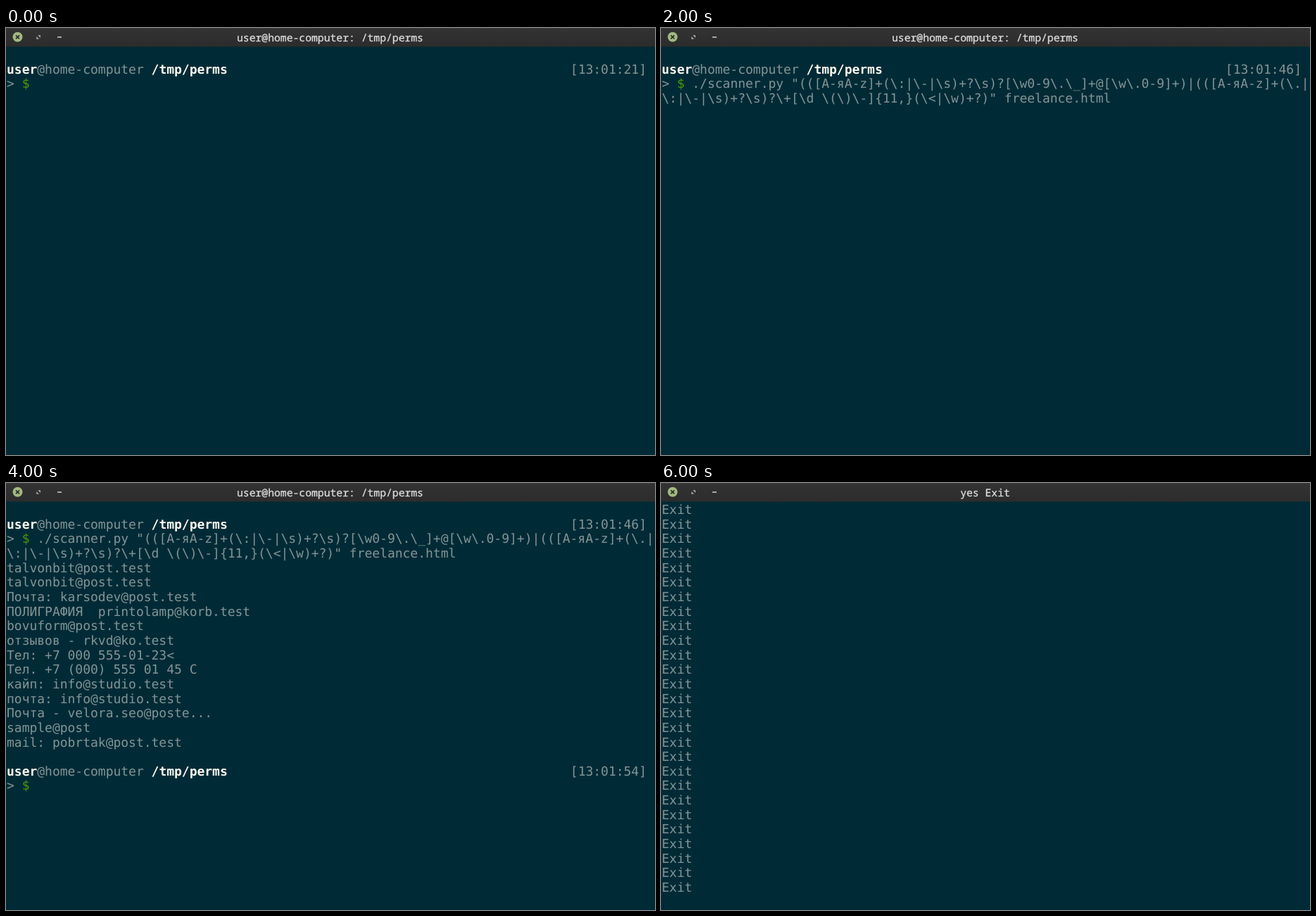
Recreate the animation shown at these times as an HTML page. Size 922 by 607 pixels, loop 8000 ms.

```html
<!DOCTYPE html>
<html lang="en">
<head>
<meta charset="utf-8">
<title>Terminal</title>
<style>
  html, body { margin: 0; width: 100%; height: 100%; overflow: hidden; background: #002b36; }
  svg { display: block; width: 922px; height: 607px; }
  text { white-space: pre; text-rendering: geometricPrecision; }
  #screen { font: 17.975px "DejaVu Sans Mono", monospace; fill: #839496; }
  #title { font: 500 14.72px "Noto Sans Mono", monospace; fill: #dcdcdc; stroke: #dcdcdc; stroke-width: .3px; text-anchor: middle; }
  .bold { font-weight: bold; fill: #fdfaf0; }
  .green { fill: #4e9a06; }
</style>
</head>
<body>
<svg viewBox="0 0 922 607">
  <defs>
    <linearGradient id="bar" x2="0" y2="1">
      <stop stop-color="#333"/>
      <stop offset="1" stop-color="#2c2c2c"/>
    </linearGradient>
  </defs>
  <rect width="922" height="607" fill="#002b36"/>
  <rect width="922" height="26.5" fill="url(#bar)"/>
  <rect width="922" height="1" fill="#3b3b3b"/>
  <circle cx="16.5" cy="12.8" r="7" fill="#a3b981"/>
  <path d="M14 10.3l5 5m0-5l-5 5" stroke="#2d2d2d" stroke-width="1.7"/>
  <path d="M45.2 10.2h3.8v3.8zM43.2 12v3.8h3.8z" fill="#a8a8a8"/>
  <path d="M73 13h6" stroke="#b5b5b5" stroke-width="1.8"/>
  <text id="title" x="460.5" y="18.6"></text>
  <g id="screen"></g>
</svg>
<script>
const COL = 10.822, ROW = 20.66, LEFT = 1, TOP = 43.95, HOLD = 2000;
const title = document.getElementById("title");
const screen = document.getElementById("screen");

const esc = s => s.replace(/&/g, "&amp;").replace(/</g, "&lt;");
const line = (row, html, col = 0) =>
  `<text x="${LEFT + col * COL}" y="${TOP + row * ROW}">${html}</text>`;
const lines = (row, list) => list.map((s, i) => line(row + i, esc(s))).join("");

const prompt = (row, time, command = "") =>
  line(row, '<tspan class="bold">user</tspan>@home-computer <tspan class="bold">/tmp/perms</tspan>') +
  line(row, `[${time}]`, 74) +
  line(row + 1, '&gt; <tspan class="green">$</tspan> ' + esc(command));

const command = String.raw`./scanner.py "(([А-яА-z]+(\:|\-|\s)+?\s)?[\w0-9\.\_]+@[\w\.0-9]+)|(([А-яА-z]+(\.|`;
const rest = String.raw`\:|\-|\s)+?\s)?\+[\d \(\)\-]{11,}(\<|\w)+?)" freelance.html`;
const results = [
  "talvonbit@post.test",
  "talvonbit@post.test",
  "Почта: karsodev@post.test",
  "ПОЛИГРАФИЯ  printolamp@korb.test",
  "bovuform@post.test",
  "отзывов - rkvd@ko.test",
  "Тел: +7 000 555-01-23<",
  "Тел. +7 (000) 555 01 45 С",
  "кайп: info@studio.test",
  "почта: info@studio.test",
  "Почта - velora.seo@poste...",
  "sample@post",
  "mail: pobrtak@post.test"
];

const shellTitle = "user@home-computer: /tmp/perms";
const typed = prompt(1, "13:01:46", command) + lines(3, [rest]);
const scenes = [
  [shellTitle, prompt(1, "13:01:21")],
  [shellTitle, typed],
  [shellTitle, typed + lines(4, results) + prompt(18, "13:01:54")],
  ["yes Exit", lines(0, Array(27).fill("Exit"))]
];

let shown = -1;
function show(now) {
  const index = Math.floor(now / HOLD) % scenes.length;
  if (index !== shown) {
    shown = index;
    [title.textContent, screen.innerHTML] = scenes[index];
  }
}

const start = performance.now();
function tick() {
  show(performance.now() - start);
  requestAnimationFrame(tick);
}
tick();
</script>
</body>
</html>
```
